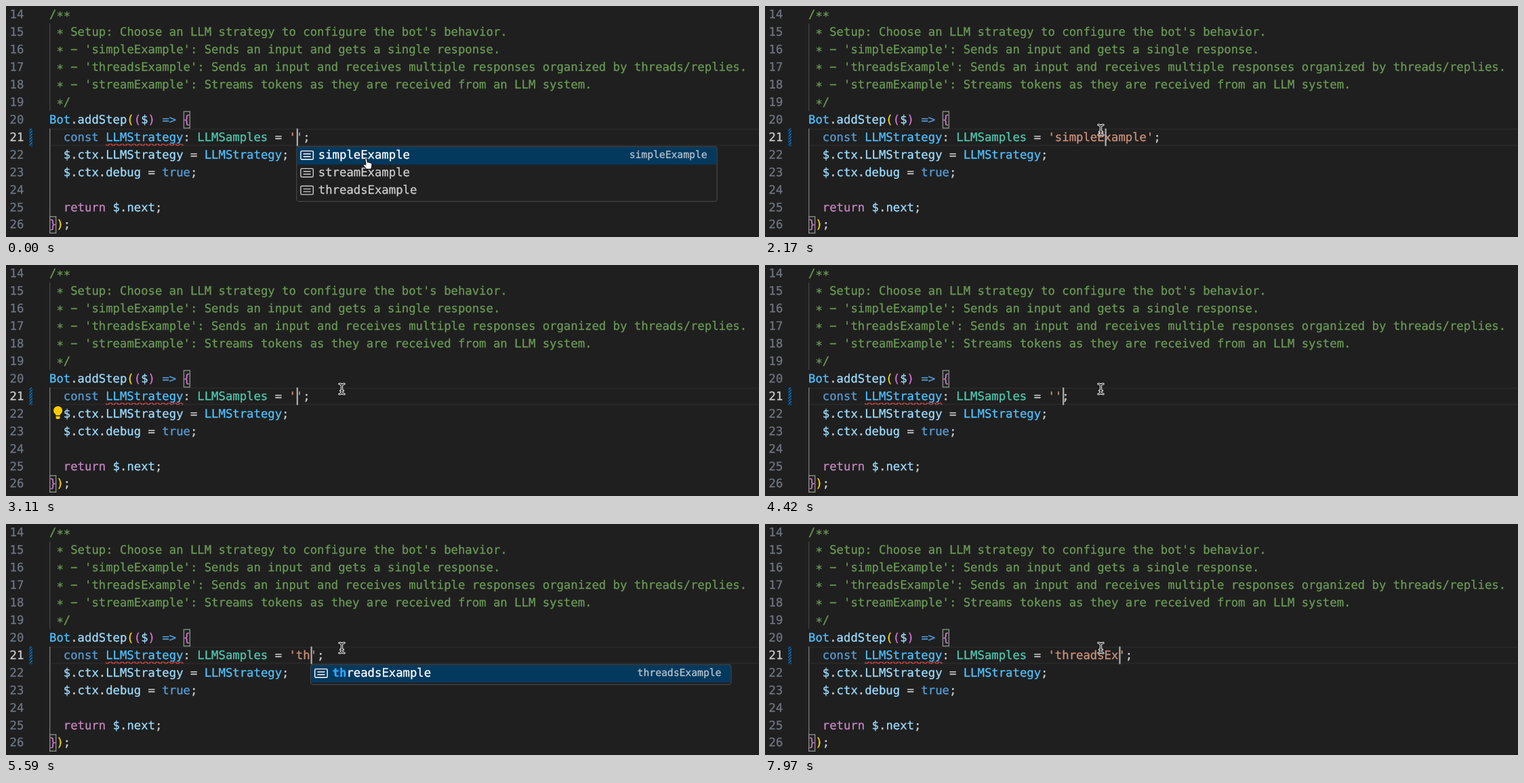
These frames come from a looping animation (1111x342 px, 8 s). An HTML page:

```html
<!DOCTYPE html>
<html lang="en">
<head>
<meta charset="utf-8">
<title>Editor completion</title>
<style>
  html, body { margin: 0; width: 100%; height: 100%; overflow: hidden; background: #1f1f1f; }
  svg { display: block; width: 100vw; height: 100vh; }
  text { font: 17.28px "DejaVu Sans Mono", monospace; white-space: pre; text-rendering: geometricPrecision; }
  text, tspan { fill: currentColor; stroke: currentColor; stroke-width: .3px; }
</style>
</head>
<body>
<svg viewBox="0 0 1111 342" xml:space="preserve">
  <defs>
    <pattern id="wave" width="6" height="3" patternUnits="userSpaceOnUse" patternTransform="translate(147.2 203.04) scale(1.44)">
      <path fill="#f14c4c" d="M5.5 0L2.5 3H1.1L4.1 0ZM4 0L6 2V.6L5.4 0ZM0 2L1 3H2.4L0 .6Z"/>
    </pattern>
    <pattern id="hatch" width="4" height="4" patternUnits="userSpaceOnUse" patternTransform="translate(34.5 181.44) scale(1.08)">
      <path fill="#0078d4" d="M2 0H4L0 4V2ZM4 2V4H2Z"/>
    </pattern>
    <path id="beamLine" d="M-3.6-7.5Q-.5-7.5 0-5Q.5-7.5 3.6-7.5M0-5V5M-3.6 7.5Q-.5 7.5 0 5Q.5 7.5 3.6 7.5M-2 2.5H2"/>
  </defs>
  <g id="editor"></g>
  <path id="hand" transform="translate(531 225.5)" fill="#fff" stroke="#000" stroke-linejoin="round"
    d="M-1.2 1Q.2-.6 1.5 1L2.4 6Q4 5 5 6.6Q6.5 5.8 7.3 7.4Q9 7 9 9Q9 13 7.5 16H.8Q-1 13-4 10.5Q-4.6 8.2-1.6 9L0 10Z"/>
  <g id="beam" fill="none" stroke-linecap="round">
    <use href="#beamLine" stroke="#fff" stroke-width="3.2"/>
    <use href="#beamLine" stroke="#000" stroke-width="1.1"/>
  </g>
</svg>
<script>
const LOOP = 8000, LEFT = 64, CHAR = 10.403, LINE = 25.92, BASE = 18.45;
const QUOTE_COL = 34;
const $ = id => document.getElementById(id);
const colX = col => LEFT + col * CHAR;

const colors = {
  c: '#6a9955', k: '#569cd6', b: '#4fc1ff', v: '#9cdcfe', t: '#4ec9b0', s: '#ce9178',
  r: '#c586c0', g: '#ffd700', o: '#da70d6', w: '#cccccc'
};

// "~x" switches to the colour named x
const code = [
  '~c/**',
  "~c * Setup: Choose an LLM strategy to configure the bot's behavior.",
  "~c * − 'simpleExample': Sends an input and gets a single response.",
  "~c * − 'threadsExample': Sends an input and receives multiple responses organized by threads/replies.",
  "~c * − 'streamExample': Streams tokens as they are received from an LLM system.",
  '~c */',
  '~bBot~w.~vaddStep~g(~o(~v$~o)~k => ~o{',
  '',
  '~v  $~w.~vctx~w.~vLLMStrategy~w = ~bLLMStrategy~w;',
  '~v  $~w.~vctx~w.~vdebug~w = ~ktrue~w;',
  '',
  '~r  return~v $~w.~vnext~w;',
  '~o}~g)~w;'
];
const names = ['simpleExample', 'streamExample', 'threadsExample'];
const menu = (col, items, typed = 0, detail = true) => ({ col, items, typed, detail });
const threads = n => ({ lit: `'${names[2].slice(0, n)}'`, caret: n + 1, on: 1 });

// caret is counted from the opening quote
const steps = [
  [0, { lit: "''", tail: ';', caret: 1, on: 1, squiggle: 1, brackets: 1, menu: menu(1, names) }],
  [420, { on: 0 }],
  [960, { on: 1 }],
  [1050, { lit: "'simpleExample'", caret: 14, menu: null }],
  [1600, { on: 0 }],
  [1760, { squiggle: 0 }],
  [2110, { caret: 8, on: 1 }],
  [2350, { caret: 14, select: '#264f78', brackets: 0 }],
  [2410, { mark: 1 }],
  [2590, { bulb: 1, select: '#2f5377' }],
  [2760, { lit: "''", caret: 1, select: 0, mark: 0, bulb: 0 }],
  [2820, { brackets: 1 }],
  [3110, { squiggle: 1, bulb: 1 }],
  [3230, { on: 0 }],
  [3350, { bulb: 0 }],
  [3710, { on: 1 }],
  [4240, { on: 0 }],
  [4420, { caret: 2, on: 1 }],
  [4840, { lit: "'", caret: 1 }],
  [4900, { lit: "';", tail: '' }],
  [4950, { lit: ';', caret: 0 }],
  [5010, { lit: '', tail: ';' }],
  [5190, { lit: "''", caret: 1, menu: menu(1, names, 0, false) }],
  [5240, { menu: menu(1, names) }],
  [5540, { ...threads(1), menu: menu(1, [names[2]], 1) }],
  [5590, { ...threads(2), menu: menu(3, [names[2]], 2) }],
  [6130, { on: 0 }],
  [6370, { ...threads(14), menu: null }],
  [6780, { squiggle: 0 }],
  [6900, { on: 0 }],
  [7200, threads(13)],
  [7560, threads(12)],
  [7660, threads(11)],
  [7760, { squiggle: 1 }],
  [7860, threads(10)],
  [7970, threads(9)]
];
let last = {};
const states = steps.map(([, change]) => last = { ...last, ...change });

const rect = (x, y, w, h, fill, more = '') =>
  `<rect x="${x}" y="${y}" width="${w}" height="${h}" fill="${fill}" ${more}/>`;
const text = (x, y, body, color, more = '') =>
  `<text x="${x}" y="${y}" color="${color}" ${more}>${body}</text>`;

// asterisks sit at mid height
const lowerStars = s => s.replace(/(\*+)(.?)/, '<tspan dy="2.8">$1</tspan><tspan dy="-2.8">$2</tspan>');
const paint = line => line.split('~').slice(1)
  .map(p => `<tspan color="${colors[p[0]]}">${lowerStars(p.slice(1))}</tspan>`).join('');

const bracket = (col, row) =>
  rect(colX(col) + .72, row * LINE + .72, CHAR - 1.44, LINE - 1.44, 'rgba(0,100,0,.1)', 'stroke="#888" stroke-width="1.44"');

function drawMenu({ col, items, typed, detail }) {
  const x = colX(QUOTE_COL + col) + .7, top = 8 * LINE + .7;
  let out = rect(x, top, 620.3, items.length * LINE + 3.6, '#202020', 'stroke="#454545" stroke-width="1.3" rx="3.5"');
  out += rect(x + .7, top + .7, 618.9, LINE, '#04395e', 'rx="2.5"');
  items.forEach((name, i) => {
    const y = top + i * LINE, ink = i ? '#cccccc' : '#ffffff';
    out += `<g transform="translate(${x} ${y})" fill="none" stroke="${ink}" stroke-width="1.4">
      <rect x="6.1" y="6.6" width="18.4" height="12.6" rx="1.6"/><path d="M9.8 11H20.8M9.8 15H20.8"/></g>`;
    const label = typed
      ? `<tspan color="#2aaaff" font-weight="bold">${name.slice(0, typed)}</tspan>${name.slice(typed)}`
      : name;
    out += text(x + 32, y + 18.1, label, ink);
  });
  if (detail)
    out += text(x + 605.8, top + 17.4, items[0], '#fff', 'text-anchor="end" opacity=".7" style="font-size:14.7px"');
  return out;
}

function draw(s) {
  const top = 7 * LINE;
  let out = rect(LEFT + 1, top + 1, 1060, LINE - 2, 'none', 'stroke="#282828" stroke-width="2"');
  out += rect(34.5, top, 4.32, LINE, 'url(#hatch)');
  out += rect(LEFT, LINE, 1.44, 5 * LINE, '#404040') + rect(LEFT, top, 1.44, 5 * LINE, '#707070');
  if (s.brackets) out += bracket(19, 6) + bracket(0, 12);
  if (s.select) out += rect(colX(35), top, 13 * CHAR, LINE, s.select, 'rx="4"');
  if (s.mark) out += rect(colX(5), 2 * LINE, 13 * CHAR, LINE, '#36424f', 'rx="4"');
  code.forEach((line, i) => {
    const y = i * LINE + BASE;
    const body = i == 7 ? `~k  const ~bLLMStrategy~w: ~tLLMSamples~w = ~s${s.lit}~w${s.tail}` : line;
    out += text(5.6, y, 14 + i, i == 7 ? '#cccccc' : '#6e7681') + text(LEFT, y, paint(body), '#cccccc');
  });
  if (s.squiggle) out += rect(colX(8), top + LINE - 4.32, 11 * CHAR, 4.32, 'url(#wave)');
  if (s.bulb)
    out += '<path fill="#ffcc00" transform="translate(.6 .3)" d="M73 222.5Q72.8 220.8 71.2 219.5A6.5 6.5 0 1 1 80.8 219.5Q79.2 220.8 79 222.5ZM73 223.8H79V226Q79 227.8 77.2 227.8H74.8Q73 227.8 73 226Z"/>';
  if (s.on) out += rect(colX(QUOTE_COL + s.caret) + .6, top, 2.2, LINE, '#aeafad');
  if (s.menu) out += drawMenu(s.menu);
  return out;
}

let shown = -1;
function frame(now) {
  const t = now % LOOP;
  const i = steps.findLastIndex(([at]) => at <= t);
  if (i != shown) $('editor').innerHTML = draw(states[shown = i]);
  const p = Math.min(1, Math.max(0, (t - 1480) / 520)), e = p * p * (3 - 2 * p);
  $('beam').setAttribute('transform', `translate(${531.5 - 36 * e} ${225.3 - 41.8 * e})`);
  $('hand').style.display = t < 1130 ? '' : 'none';
  $('beam').style.display = t < 1130 ? 'none' : '';
  requestAnimationFrame(frame);
}
frame(0);
</script>
</body>
</html>
```
